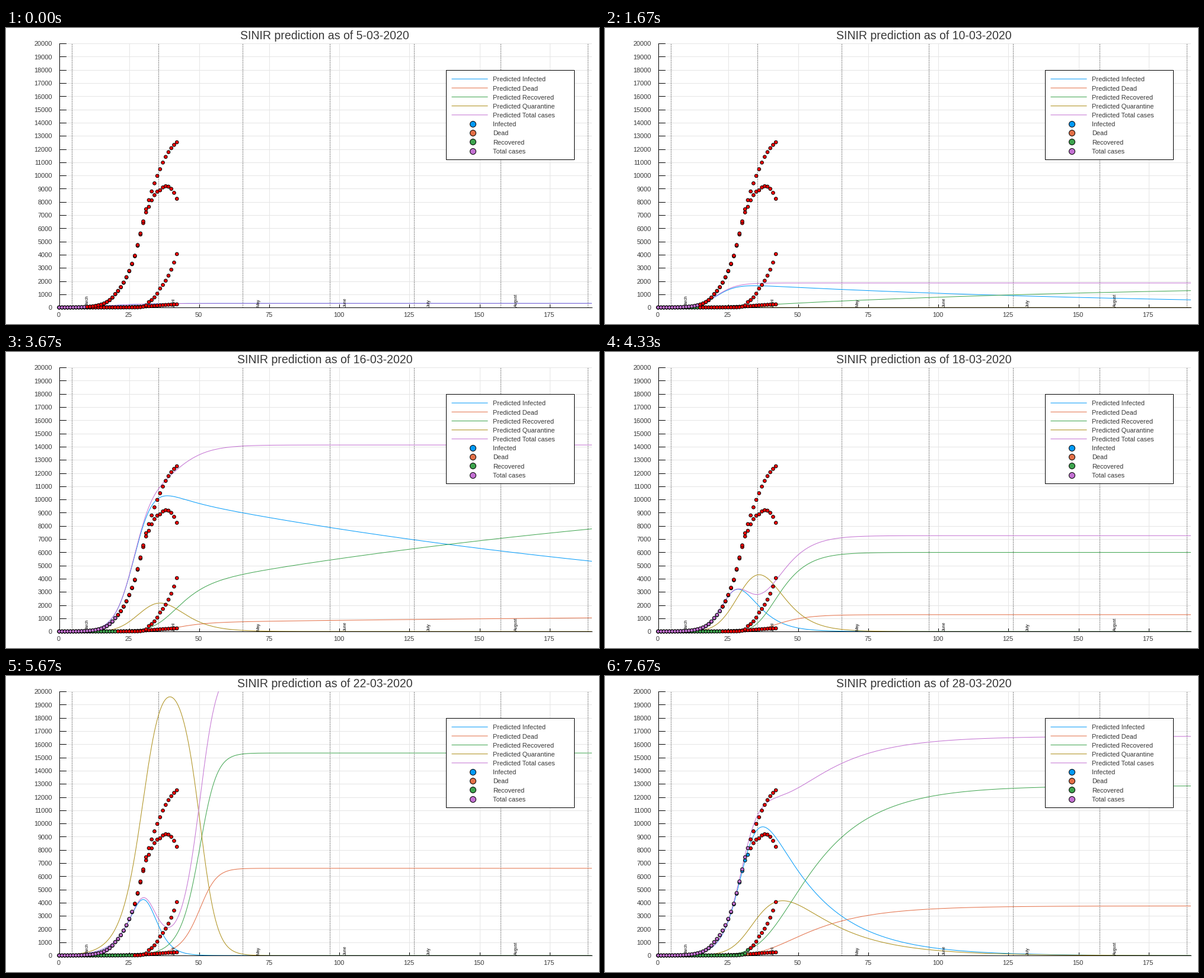
A matplotlib script that plays this animation: 1000x500 px, repeating every 8 s.

```python
import numpy as np
import matplotlib.pyplot as plt
from matplotlib.animation import FuncAnimation
from matplotlib.patches import Rectangle

W, H, LOOP, STEP, DATES = 1000, 500, 8000, 40, 24
PX = 0.72  # points per pixel at 100 dpi
LEFT, BOTTOM, AXW, AXH = 89.7, 27.9, 898, 446
BLUE, ORANGE, GREEN, PURPLE, OLIVE = "#009afa", "#e36f47", "#3ea44e", "#c371d2", "#ac8e18"
INK, GRID = "#383838", "#e5e5e5"

plt.rcParams["font.family"] = "Liberation Sans"


def rise(x, k, mid, v=1):
    """Growth from 0 to 1; v skews the S shape."""
    return (1 + np.exp(-k * (x - mid))) ** (-1 / v)


# Daily counts: growth whose log-odds bend at a few days
days = np.arange(43)
odds = np.interp(days, [0, 20, 27, 31, 36, 42], [-8.8, -2.49, -.87, .24, 1.31, 2.77])
total = 13300 * rise(odds, 1, 0)
recovered = np.exp(np.interp(days, [0, 28, 32, 36, 42], np.log([1, 9, 410, 1436, 4046])))
dead = 275 * rise(days, .24, 34.5)
infected = total - recovered - dead

# Epidemic model: caught -> held in quarantine -> gone (recovered or dead)
DT = 0.25
t = np.arange(0, 190 + DT, DT)


def lag(x, rate):
    a = 1 - np.exp(-rate * DT)
    y = np.zeros_like(x)
    for i in range(1, len(x)):
        y[i] = y[i - 1] + a * (x[i] - y[i - 1])
    return y


def stage(x, spec):
    """A tuple is its own growth curve, a list holds successive decay rates."""
    if isinstance(spec, tuple):
        return rise(t, *spec)
    for rate in spec:
        x = lag(x, rate)
    return x


def predict(size, growth, hold, leave, fatal):
    caught = rise(t, *growth)
    held = stage(caught, hold)
    gone = stage(held, leave)
    return size * np.array([caught - held, fatal * gone, (1 - fatal) * gone,
                            held - gone, caught - held + gone])


# Key forecasts by day after 5 March; the days between blend their neighbours
FITS = {
    0: predict(310, (.14, 19), [0], [5], 0),
    5: predict(1855, (.28, 21), [.0069], [5], 0),
    9: predict(21000, (.297, 28.2), [.0042], [5], .077),
    13: predict(7260, (.33, 24.1), (.16, 21.9, .3), (.153, 26.42, .1), .175),
    17: predict(21940, (.405, 29.57, 2), (.315, 31.27, 1.5), (.352, 51.45, 1.5), .301),
    20: predict(14050, (.232, 30.7), [.00458], [.45], .31),
    23: predict(16600, (.28, 30.2), [.05], [.3] * 3, .226),
}


def blend(n):
    lo = max(k for k in FITS if k <= n)
    hi = min(k for k in FITS if k >= n)
    mix = (n - lo) / max(hi - lo, 1)
    return (1 - mix) * FITS[lo] + mix * FITS[hi]


curves = [blend(n) for n in range(DATES)]

# Stage
fig = plt.figure(figsize=(W / 100, H / 100), dpi=100, facecolor="white")
ax = fig.add_axes([LEFT / W, BOTTOM / H, AXW / W, AXH / H])
ax.set(xlim=(0, 190), ylim=(0, 20000), xticks=[], yticks=[])
ax.spines[["top", "right"]].set_visible(False)
for side in ("left", "bottom"):
    ax.spines[side].set(linewidth=PX, zorder=1.5)

page = fig.add_axes([0, 0, 1, 1])
page.set(xlim=(0, W), ylim=(H, 0))
page.axis("off")


def label(x, y, s, size=11, ha="center"):
    return page.text(x, y, s, fontsize=size * PX, ha=ha, va="baseline", color=INK)


tick = dict(color="black", lw=PX, zorder=1, clip_on=False)
for v in range(0, 20001, 1000):
    ax.axhline(v, color=GRID, lw=PX, zorder=0)
    ax.plot([0, 11 / AXW], [v, v], transform=ax.get_yaxis_transform(), **tick)
    label(78, H - BOTTOM - v / 20000 * AXH + 4.2, v, ha="right")
for d in range(0, 176, 25):
    ax.axvline(d, color=GRID, lw=PX, zorder=0)
    ax.plot([d, d], [0, 5.4 / AXH], transform=ax.get_xaxis_transform(), **tick)
    label(LEFT - 1 + d / 190 * AXW, 487.8, d)

starts = 4.5 + np.cumsum([0, 31, 30, 31, 30, 31, 31])
months = ["March", "April", "May", "June", "July", "August", ""]
for d, name in zip(starts, months):
    ax.axvline(d, color="black", lw=PX, ls=(0, (1, 2)), zorder=1)
    ax.text(d + 6.3, 70, name, rotation=90, fontsize=7.1 * PX,
            ha="right", va="bottom", color="black", zorder=3.5)

# Curves and dots
names = {"Infected": BLUE, "Dead": ORANGE, "Recovered": GREEN,
         "Quarantine": OLIVE, "Total cases": PURPLE}
counts = {BLUE: infected, ORANGE: dead, GREEN: recovered, PURPLE: total}
lines = [ax.plot([], [], color=c, lw=PX, zorder=3)[0] for c in names.values()]
dots = [ax.scatter(days, v, s=(5.6 * PX) ** 2, edgecolors="black",
                   linewidths=PX, zorder=4, clip_on=False) for v in counts.values()]

# Legend
page.add_patch(Rectangle((742.1, 70.9), 216, 151, fc="white", ec="black", lw=PX))
rows = [("Predicted " + s, c) for s, c in names.items()]
rows += [(s, c) for s, c in names.items() if c in counts]
for i, (text, color) in enumerate(rows):
    y = 86.1 + 15.18 * i
    if i < len(names):
        page.plot([752, 812], [y, y], color=color, lw=PX, snap=False)
    else:
        page.scatter(787, y, s=(10 * PX) ** 2, c=color, edgecolors="black", linewidths=PX)
    label(820.7, y + 4.3, text, ha="left")

title = label(537.5, 19, "", size=19.55)


def update(i):
    n = min(int((i + 1) * STEP * DATES / LOOP), DATES - 1)
    title.set_text(f"SINIR prediction as of {5 + n}-03-2020")
    for line, values in zip(lines, curves[n]):
        line.set_data(t, values)
    for dot, color in zip(dots, counts):
        dot.set_facecolor([color if d <= 9 + n else "red" for d in days])
    return [title, *lines, *dots]


anim = FuncAnimation(fig, update, frames=LOOP // STEP, interval=STEP,
                     repeat=True, repeat_delay=0, blit=False)
plt.show()
```
